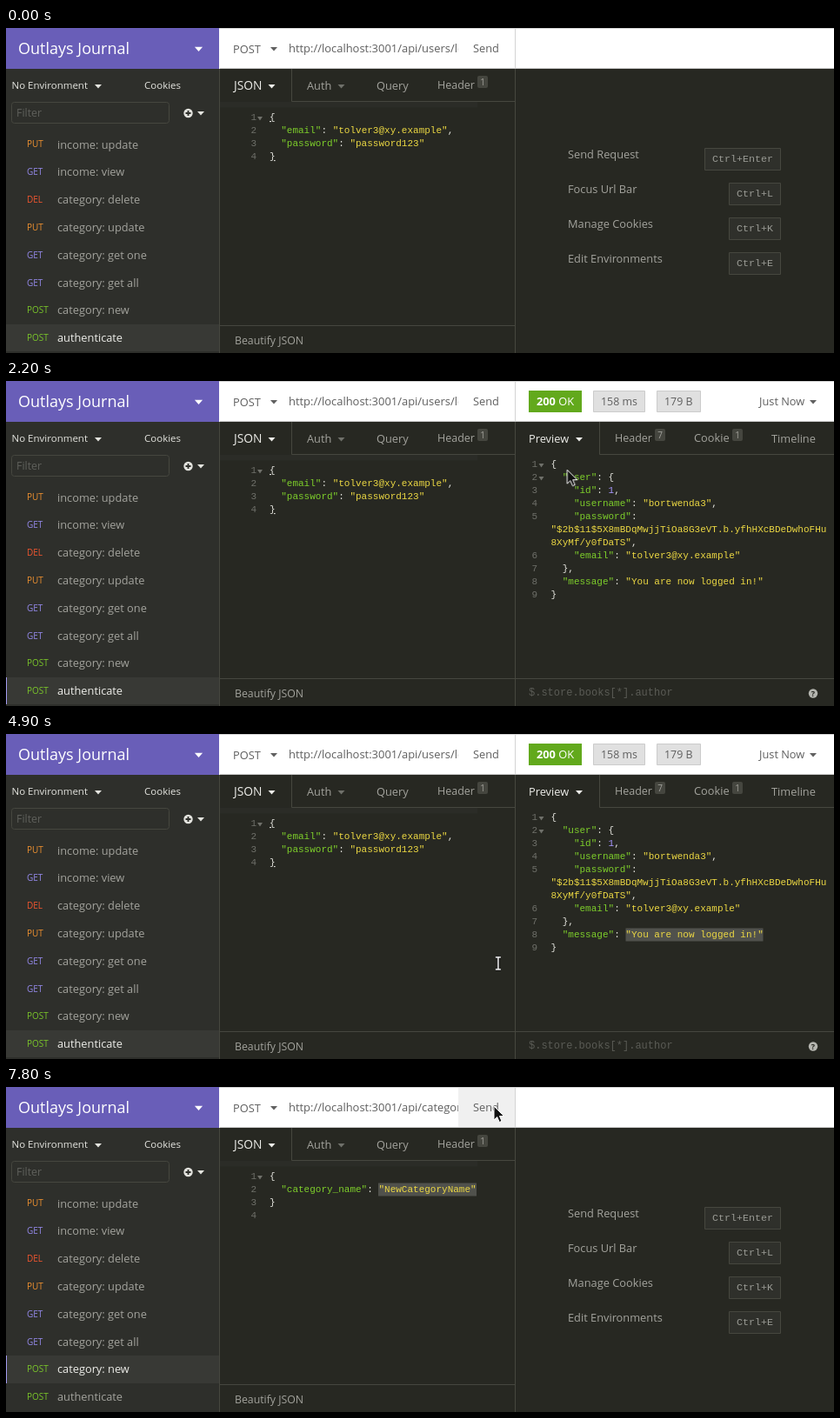
Recreate the animation shown at these times as an HTML page. Size 952 px wide and 374 px high, loop 8 s.

```html
<!DOCTYPE html>
<html lang="en">
<head>
<meta charset="utf-8">
<title>API client</title>
<style>
html, body { margin: 0; width: 100%; height: 100%; overflow: hidden; background: #272822; }
svg { display: block; width: 952px; height: 374px; }
text { font: 12.8px "Open Sans", "Noto Sans", sans-serif; fill: #a3a39d; white-space: pre; }
.code text { font: 11px "Liberation Mono", monospace; fill: #e6e6e0; }
.code .num { fill: #6f706a; text-anchor: end; }
.code .keys { font-size: 11.7px; fill: #999a94; }
.code .hint { font-size: 12px; fill: #5a5b55; }
.code .s { fill: #ecd843; }
.method text { font-size: 10px; }
.badge text { font-size: 10px; text-anchor: middle; }
.badge rect { fill: #45463f; }
.small text { font-size: 11.5px; fill: #e4e4df; }
.top text { fill: #5f5f5f; }
.top .url { font-size: 12.95px; }
.k { fill: #7ecf2b; }
.n { fill: #a896ff; }
.u { text-decoration: underline; }
.method .put { fill: #ef9130; }
.method .get { fill: #9388e8; }
.method .del { fill: #f0552f; }
.method .post { fill: #7ac52a; }
.on { fill: #eeeeea; }
.line { fill: none; stroke: #46473f; }
.key { fill: #2f302b; stroke: #46473f; }
.pick { fill: #50514c; }
.row { fill: #383935; }

/* 8 s timeline: 1% = 80 ms */
.early, .late, .idle, .reply, .focus, .send, .hbar, .vbar, .menu1, .menu2, .hover, .fold, .arrow, .beam, .load {
  opacity: 0; animation: 8s step-end infinite;
}
.early { animation-name: early; }
.late { animation-name: late; }
.idle { animation-name: idle; }
.reply { animation-name: reply; }
.focus { animation-name: focus; }
.send { animation-name: send; }
.hbar { animation-name: hbar; }
.vbar { animation-name: vbar; }
.menu1 { animation-name: menu1; }
.menu2 { animation-name: menu2; }
.hover { animation-name: hover; }
.fold { animation-name: fold; }
.arrow { animation-name: arrow; }
.beam { animation-name: beam; }
.load { animation-name: load; }
.dim { animation: dim 8s step-end infinite; }
.lit { animation: lit 8s step-end infinite; }
.spin { animation: spin 2s steps(20) -20ms infinite; }
.sel { animation: sel 8s step-end infinite; }
.mouse { animation: mouse 8s step-end infinite; }

@keyframes early { 0% { opacity: 1 } 75% { opacity: 0 } }
@keyframes late { 75% { opacity: 1 } }
@keyframes idle { 0% { opacity: 1 } 27.5% { opacity: 0 } 75% { opacity: 1 } }
@keyframes reply { 27.5% { opacity: 1 } 75% { opacity: 0 } }
@keyframes focus { 20% { opacity: 1 } 45% { opacity: 0 } }
@keyframes send { 17.5% { opacity: 1 } 26.25% { opacity: 0 } 97.5% { opacity: 1 } }
@keyframes hbar { 11.25% { opacity: 1 } 17.5% { opacity: 0 } 93.75% { opacity: 1 } 97.5% { opacity: 0 } }
@keyframes vbar { 66.25% { opacity: 1 } 86.25% { opacity: 0 } }
@keyframes menu1 { 66.25% { opacity: 1 } 73.75% { opacity: 0 } }
@keyframes menu2 { 73.75% { opacity: 1 } 86.25% { opacity: 0 } }
@keyframes hover { 73.75% { opacity: 1 } 75% { opacity: 0 } }
@keyframes fold { 80% { opacity: 1 } }
@keyframes arrow { 10% { opacity: 1 } 28.75% { opacity: 0 } 66.25% { opacity: 1 } 86.25% { opacity: 0 } 95% { opacity: 1 } }
@keyframes beam { 28.75% { opacity: 1 } 66.25% { opacity: 0 } 86.25% { opacity: 1 } 95% { opacity: 0 } }
@keyframes load { 21.25% { opacity: .25; animation-timing-function: steps(3) } 25% { opacity: 1 } 27.5% { opacity: 0 } }
@keyframes dim { 0% { fill: #eeeeea } 75% { fill: #a3a39d } }
@keyframes lit { 0% { fill: #a3a39d } 75% { fill: #eeeeea } }
@keyframes spin { to { transform: rotate(360deg) } }
@keyframes sel {
  0% { transform: scaleX(0) }
  43.75% { transform: scaleX(0); animation-timing-function: steps(5) }
  50% { transform: scaleX(.709); animation-timing-function: steps(2) }
  52.5%, 100% { transform: scaleX(1) }
}
@keyframes mouse {
  0% { transform: translate(592px, 140px) }
  10% { transform: translate(592px, 140px); animation-timing-function: steps(4) }
  15% { transform: translate(559px, 66px); animation-timing-function: steps(4) }
  20% { transform: translate(556px, 21px) }
  25% { transform: translate(556px, 21px); animation-timing-function: steps(5) }
  31.25% { transform: translate(779px, 224px); animation-timing-function: steps(2) }
  33.75% { transform: translate(830px, 237px); animation-timing-function: steps(6) }
  41.25% { transform: translate(870px, 231px) }
  43.75% { transform: translate(870px, 231px); animation-timing-function: steps(5) }
  50% { transform: translate(746px, 232px); animation-timing-function: steps(2) }
  52.5% { transform: translate(708px, 232px); animation-timing-function: steps(2) }
  55% { transform: translate(733px, 231px) }
  58.75% { transform: translate(733px, 231px); animation-timing-function: steps(7) }
  67.5% { transform: translate(148px, 346px) }
  73.75% { transform: translate(145px, 327px) }
  82.5% { transform: translate(145px, 327px); animation-timing-function: steps(7) }
  91.25% { transform: translate(510px, 137px) }
  92.5% { transform: translate(510px, 137px); animation-timing-function: steps(4) }
  97.5%, 100% { transform: translate(561px, 22px) }
}
</style>
</head>
<body>
<svg viewBox="0 0 952 374">
  <defs>
    <path id="tri" d="M-4-2h8L0 2.5z"/>
    <clipPath id="url"><path d="M320 0h200v46h-200z"/></clipPath>
  </defs>
  <rect width="952" height="374" fill="#272822"/>

  <!-- Sidebar -->
  <rect width="245" height="374" fill="#2e2f2b"/>
  <rect width="245" height="47" fill="#695eb8"/>
  <text x="14" y="30" style="font-size:18px;fill:#fff">Outlays Journal</text>
  <use href="#tri" transform="translate(221.500 24) scale(1.15)" fill="#fff"/>
  <g class="small">
    <text x="6.500" y="70">No Environment</text>
    <text x="159" y="70">Cookies</text>
  </g>
  <use href="#tri" x="106" y="67" fill="#e4e4df"/>
  <rect class="line" x="6.500" y="85.500" width="181" height="24" rx="3"/>
  <text x="12" y="102" style="font-size:12.400px;fill:#5f605b">Filter</text>
  <circle cx="209.500" cy="98" r="5.200" fill="#e4e4df"/>
  <path d="M206.500 98h6m-3-3v6" stroke="#2e2f2b" stroke-width="1.800"/>
  <use href="#tri" x="224" y="98" fill="#e4e4df"/>

  <rect class="row early" y="341" width="245" height="31"/>
  <rect class="row hover" y="309" width="245" height="32"/>
  <rect class="row late" y="309" width="245" height="32"/>
  <rect class="focus" y="341" width="1" height="31" fill="#a39bf0"/>
  <rect class="hover" y="309" width="1" height="32" fill="#6b6499"/>
  <rect class="late" y="309" width="1" height="32" fill="#a39bf0"/>
  <g class="method">
    <text class="put" x="24" y="137">PUT</text>
    <text class="get" x="24" y="169">GET</text>
    <text class="del" x="24" y="201">DEL</text>
    <text class="put" x="24" y="233">PUT</text>
    <text class="get" x="24" y="265">GET</text>
    <text class="get" x="24" y="296.500">GET</text>
    <text class="post" x="24" y="328">POST</text>
    <text class="post" x="24" y="360">POST</text>
  </g>
  <text x="59" y="138.500">income: update</text>
  <text x="59" y="170">income: view</text>
  <text x="59" y="202">category: delete</text>
  <text x="59" y="234">category: update</text>
  <text x="59" y="266">category: get one</text>
  <text x="59" y="297.500">category: get all</text>
  <text class="lit" x="59" y="329">category: new</text>
  <text class="dim" x="59" y="361">authenticate</text>
  <use class="menu1" href="#tri" x="223" y="357" fill="#8c8d87"/>
  <use class="menu2" href="#tri" x="223" y="325" fill="#8c8d87"/>
  <rect class="vbar" x="238" y="122" width="7" height="250" fill="#32332f"/>
  <rect class="vbar" x="238" y="163" width="7" height="99" rx="1" fill="#50514c"/>

  <!-- Top bar -->
  <rect x="245" width="707" height="47" fill="#fff"/>
  <rect class="send" x="520" y="1" width="65" height="45" fill="#f0f0f0"/>
  <path d="M245 .5h707M585.500 0v47" stroke="#d4d4d4"/>
  <path d="M246 46.500h706" stroke="#c8c8c8"/>
  <g class="top">
    <text x="261" y="28.500">POST</text>
    <g clip-path="url(#url)">
      <text class="url early" x="325" y="28">http://localhost:3001/api/users/login</text>
      <text class="url late" x="325" y="28">http://localhost:3001/api/categories</text>
    </g>
    <text x="537" y="28">Send</text>
  </g>
  <use href="#tri" x="308" y="24" fill="#5f5f5f"/>

  <!-- Request pane -->
  <path class="line" d="M245.500 47v327M585.500 47v327M328.500 47v37.500H585M246 342.500h339"/>
  <text class="on" x="262" y="71" style="font-size:13.800px;fill:#eeeeea">JSON</text>
  <use href="#tri" x="305.500" y="67" class="on"/>
  <text x="346" y="71">Auth</text>
  <use href="#tri" x="385.500" y="67" fill="#6f706a"/>
  <text x="426" y="71">Query</text>
  <text x="496" y="70" style="font-size:12.500px">Header</text>
  <g class="badge"><rect x="542" y="55" width="12" height="14" rx="2"/><text x="548" y="66">1</text></g>
  <rect x="246" y="85" width="296" height="6.500" fill="#2b2c27"/>
  <rect class="hbar" x="246" y="85" width="296" height="7" rx="3" fill="#454640"/>
  <text x="263" y="364" style="font-size:12.300px">Beautify JSON</text>
  <g class="code">
    <text class="num" y="106"><tspan x="288">1</tspan><tspan x="288" dy="15">2</tspan><tspan x="288" dy="15">3</tspan><tspan x="288" dy="15">4</tspan></text>
    <g class="early">
      <use href="#tri" transform="translate(292 104) scale(.75 1)" fill="#6f706a"/>
      <text x="303" y="106" class="u">{</text>
      <text x="303" y="121">  <tspan class="k">"email"</tspan>: <tspan class="s">"tolver3@xy.example"</tspan>,</text>
      <text x="303" y="136">  <tspan class="k">"password"</tspan>: <tspan class="s">"password123"</tspan></text>
      <text x="303" y="151" class="u">}</text>
    </g>
    <g class="late">
      <use class="fold" href="#tri" transform="translate(292 104) scale(.75 1)" fill="#6f706a"/>
      <rect class="pick" x="428" y="110.500" width="113" height="15"/>
      <text x="303" y="106">{</text>
      <text x="303" y="121">  <tspan class="k">"category_name"</tspan>: <tspan class="s">"NewCategoryName"</tspan></text>
      <text x="303" y="136">}</text>
    </g>
  </g>

  <!-- Empty response pane -->
  <g class="idle">
    <text x="646" y="150">Send Request</text>
    <text x="646" y="190">Focus Url Bar</text>
    <text x="646" y="230">Manage Cookies</text>
    <text x="646" y="270">Edit Environments</text>
    <path class="key" d="M803.500 138.500h87v25h-87zM831.500 178.500h59v25h-59zM831.500 218.500h59v25h-59zM831.500 258.500h59v25h-59z"/>
    <g class="code">
      <text class="keys" x="812" y="154">Ctrl+Enter</text>
      <text class="keys" x="840" y="194">Ctrl+L</text>
      <text class="keys" x="840" y="234">Ctrl+K</text>
      <text class="keys" x="840" y="274">Ctrl+E</text>
    </g>
  </g>

  <!-- Response -->
  <g class="reply">
    <rect x="601" y="11" width="61" height="25" fill="#62a91c"/>
    <path d="M675.500 11.500h59v24h-59zM748.500 11.500h50v24h-50z" fill="#e0e0e0" stroke="#cbcbcb"/>
    <g class="top">
      <text x="610" y="28" style="fill:#fff"><tspan font-weight="700">200</tspan> OK</text>
      <text x="684" y="28" style="font-size:12.400px">158 ms</text>
      <text x="757" y="28" style="font-size:12.400px">179 B</text>
      <text x="866" y="28">Just Now</text>
    </g>
    <use href="#tri" x="928" y="24" fill="#5f5f5f"/>
    <path class="line" d="M682.500 47v37.500H952M586 342.500h366"/>
    <text class="on" x="601" y="71">Preview</text>
    <use href="#tri" x="659" y="67" class="on"/>
    <text x="700" y="70" style="font-size:12.500px">Header</text>
    <text x="791" y="70">Cookie</text>
    <text x="880" y="71">Timeline</text>
    <g class="badge">
      <rect x="746" y="55" width="12" height="14" rx="2"/><text x="752" y="66">7</text>
      <rect x="835" y="55" width="12" height="14" rx="2"/><text x="841" y="66">1</text>
    </g>
    <g class="code">
      <rect class="pick sel" x="712.500" y="223.500" width="158" height="15" style="transform-origin:870.500px 0"/>
      <text class="num" y="99"><tspan x="611">1</tspan><tspan x="611" dy="15">2</tspan><tspan x="611" dy="15">3</tspan><tspan x="611" dy="15">4</tspan><tspan x="611" dy="15">5</tspan><tspan x="611" dy="45">6</tspan><tspan x="611" dy="15">7</tspan><tspan x="611" dy="15">8</tspan><tspan x="611" dy="15">9</tspan></text>
      <use href="#tri" transform="translate(615.500 97) scale(.75 1)" fill="#6f706a"/>
      <use href="#tri" transform="translate(615.500 112) scale(.75 1)" fill="#6f706a"/>
      <text x="626.500" y="99">{</text>
      <text x="626.500" y="114">  <tspan class="k">"user"</tspan>: {</text>
      <text x="626.500" y="129">    <tspan class="k">"id"</tspan>: <tspan class="n">1</tspan>,</text>
      <text x="626.500" y="144">    <tspan class="k">"username"</tspan>: <tspan class="s">"bortwenda3"</tspan>,</text>
      <text x="626.500" y="159">    <tspan class="k">"password"</tspan>:</text>
      <text x="626.500" y="174" class="s">"$2b$11$5X8mBDqMwjjTiOa8G3eVT.b.yfhHXcBDeDwhoFHu</text>
      <text x="626.500" y="189"><tspan class="s">8XyMf/y0fDaTS"</tspan>,</text>
      <text x="626.500" y="204">    <tspan class="k">"email"</tspan>: <tspan class="s">"tolver3@xy.example"</tspan></text>
      <text x="626.500" y="219">  },</text>
      <text x="626.500" y="234">  <tspan class="k">"message"</tspan>: <tspan class="s">"You are now logged in!"</tspan></text>
      <text x="626.500" y="249">}</text>
      <text class="hint" x="601" y="362">$.store.books[*].author</text>
    </g>
    <circle cx="928" cy="359.500" r="5.200" fill="#b4b5af"/>
    <text x="928" y="363" text-anchor="middle" style="font-size:9px;font-weight:700;fill:#272822">?</text>
  </g>

  <!-- Loading overlay -->
  <g class="load">
    <rect x="585" width="367" height="374" fill="#1a1a1a" opacity=".79"/>
    <text x="722.500" y="126" style="font-size:20px;fill:#e6e6e2">Loading...</text>
    <g transform="translate(768 180) rotate(40)">
      <g class="spin" fill="#dededa">
        <path id="half" d="M-21.200-3.600A21.500 21.500 0 0 1 15-15.400L19.500-19.500Q21.500-20.500 21.500-18V-5Q21.500-3.600 20-3.600H7Q4.500-4 6.500-6.500L11-11.300A15.900 15.900 0 0 0-15.500-3.600z"/>
        <use href="#half" transform="rotate(180)"/>
      </g>
    </g>
    <rect x="706.500" y="237.500" width="123" height="31" rx="3" fill="#1f201b" stroke="#82837e"/>
    <text x="722.500" y="258" style="fill:#eeeeea">Cancel Request</text>
  </g>

  <!-- Pointer -->
  <g class="mouse">
    <path class="arrow" d="M0 0v16l3.700-3.500L6.300 18.500l2.700-1.200L6.500 11.500H11.500z" fill="#111" stroke="#fff"/>
    <g class="beam" fill="none">
      <path d="M-3-7h6M0-7V7M-3 7h6" stroke="#111" stroke-width="3.500"/>
      <path d="M-3-7h6M0-7V7M-3 7h6" stroke="#fff" stroke-width="1.500"/>
    </g>
  </g>
</svg>
</body>
</html>
```
